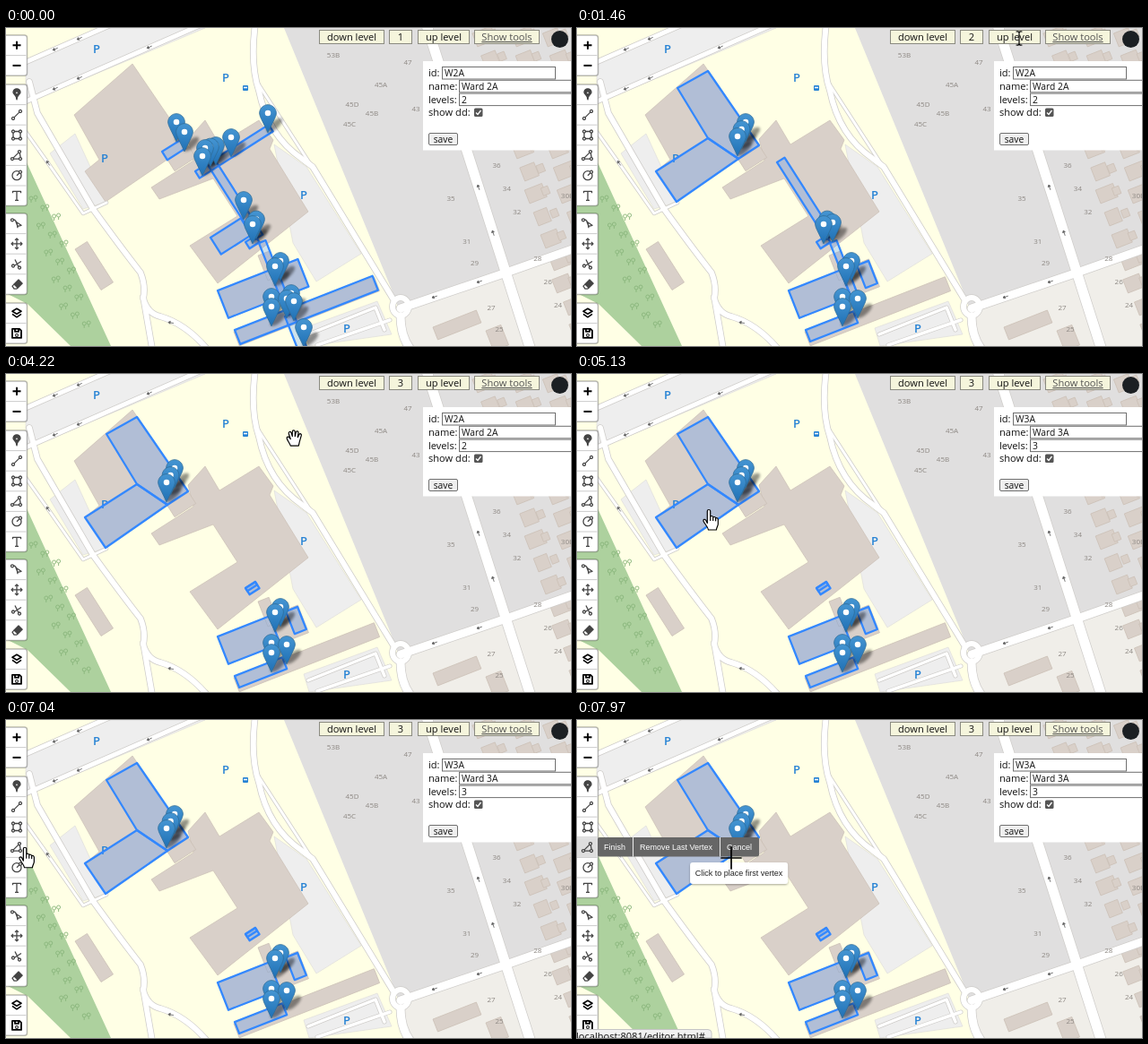
Recreate the animation shown at these times as an HTML page. Size 630 px wide and 355 px high, loop 8000 ms.

```html
<!DOCTYPE html>
<html lang="en">
<head>
<meta charset="utf-8">
<title>Floor plan editor</title>
<style>
html, body { margin: 0; width: 100%; height: 100%; overflow: hidden; }
svg { display: block; width: 100vw; height: 100vh; }
text { font-family: "Open Sans", "Noto Sans", sans-serif; white-space: pre; }
.small { font: 9px "Liberation Sans", Arial, sans-serif; }
.house { fill: #d9d0c9; stroke: #cabfb5; stroke-width: .7; }
.park { fill: #eeeeee; stroke: #dcdbd8; stroke-width: .6; }
.num { font-size: 8px; fill: #8c8782; text-anchor: middle; }
.letter { font-size: 13px; font-weight: 600; fill: #2682d4; text-anchor: middle; }
.ui { font-size: 11.1px; fill: #111; }
.value { font-size: 10.3px; fill: #111; }
.mid { text-anchor: middle; }
.box { fill: #f5f5dc; stroke: #8a8a80; }
.field { fill: #fff; stroke: #6f6f6f; }
.room { fill: #3388ff; fill-opacity: .24; stroke: #3388ff; stroke-width: 2.3; stroke-linejoin: round; }
.icon { fill: none; stroke: #444; stroke-width: 1.3; stroke-linejoin: round; }
</style>
</head>
<body>
<svg viewBox="0 0 630 355" preserveAspectRatio="none">
  <defs>
    <linearGradient id="blue" x2="0" y2="1"><stop stop-color="#4595d2"/><stop offset="1" stop-color="#1f70b5"/></linearGradient>
    <filter id="blur" x="-50%" y="-50%" width="200%" height="200%"><feGaussianBlur stdDeviation="1.8"/></filter>
    <filter id="soft" x="-10%" y="-30%" width="120%" height="170%"><feDropShadow dx="0" dy="1" stdDeviation="1.2" flood-opacity=".35"/></filter>
    <g id="pin">
      <path d="M12.5 .5C5.9 .5 .5 6.2 .5 12.4c0 2.8 1.6 6.3 2.7 8.7L12.5 40.5 21.8 21.1c1.1-2.4 2.7-5.9 2.7-8.7C24.5 6.2 19.1 .5 12.5 .5z" fill="url(#blue)" stroke="#2e6c97"/>
      <circle cx="12.5" cy="12.5" r="4.2" fill="#fff"/>
    </g>
    <ellipse id="shade" cx="22" cy="30" rx="14" ry="5.5" transform="rotate(-42 22 30)" opacity=".42" filter="url(#blur)"/>
    <g id="tree" fill="none" stroke="#8ab67c" stroke-width=".9"><circle r="2" cx="-2"/><circle r="2" cx="3" cy="-1"/><path d="M-2 2v3M3 1v3"/></g>
    <path id="arrow" d="M-3 0H3M-3 0l2-1.500v3z" fill="#666" stroke="#666" stroke-width=".8"/>
  </defs>
  <rect width="630" height="355" fill="#ffffe5"/>
  <g id="land"></g>
  <g id="roads" fill="none" stroke-linecap="round" stroke-linejoin="round"></g>
  <g id="labels"></g>
  <g id="rooms"></g>
  <g id="pins"></g>
  <g id="tip">
    <rect x="-54.5" width="109" height="24" rx="3" fill="#fff" filter="url(#soft)"/>
    <text class="small mid" y="14.5" fill="#222">Click to place first vertex</text>
  </g>
  <g id="bar"></g>
  <g id="menu" fill="#fff">
    <rect x="23" y="131" width="180" height="21.5" rx="2" fill="#666"/>
    <path d="M62.5 131v21.5M159.5 131v21.5" stroke="#eee"/>
    <text class="small" x="30" y="144.5">Finish</text><text class="small" x="70" y="144.5">Remove Last Vertex</text><text class="small" x="167" y="144.5">Cancel</text>
  </g>
  <g id="panel"></g>
  <g id="status">
    <path d="M0 345.5H146q4 0 4 4V355H0z" fill="#f1f1f1" stroke="#c4c4c4"/>
    <text class="ui" x="-1" y="357">localhost:8081/editor.html#</text>
  </g>
  <g id="cursor" fill="#fff" stroke="#000" stroke-width="1.2" stroke-linejoin="round" stroke-linecap="round">
    <path id="grab" d="M-4 8.500C-5 5-9 1-8-1c1-1.500 3 0 4 2L-6-5c-.5-2.500 2-3 2.800-1L-2-2V-7c0-2.300 2.800-2.300 3 0V-2L2-6.500c.6-2.200 3-1.500 2.700 .5L4-1 5.500-4c1-1.800 3-.8 2.500 1L6 4 5 8.500z"/>
    <path id="hand" d="M-1.700 15V1.500C-1.700-.5 1.700-.5 1.700 1.500V8c.4-1.500 3-1.300 3 .6 .6-1 2.800-.8 2.900 .9 .7-.8 2.700-.4 2.700 1.500V16c0 2-1.700 3.500-1.900 6.500H-.5C-1 19-5 15.500-6 12.700c-.6-2 1.500-2.500 2.500-1.200zM1.700 8v4M4.700 8.600v3.400M7.600 9.500v2.800"/>
    <path id="beam" d="M-3-7.500Q0-8 0-6 0-8 3-7.500M0-6.500V6.500M-3 7.500Q0 8 0 6 0 8 3 7.500" fill="none"/>
    <path id="cross" d="M-11 0H11M0-12V12" stroke-width="1.700"/>
  </g>
</svg>
<script>
const $ = id => document.getElementById(id);
const add = (id, html) => $(id).insertAdjacentHTML('beforeend', html);
const show = (id, on) => $(id).setAttribute('display', on ? 'inline' : 'none');
const place = (id, x, y) => $(id).setAttribute('transform', `translate(${x} ${y})`);
const poly = (cls, points) => `<polygon class="${cls}" points="${points}"/>`;
const text = (cls, x, y, s, id = '') => `<text class="${cls}" x="${x}" y="${y}" id="${id}">${s}</text>`;
const rect = (cls, x, y, w, h, more = '') => `<rect class="${cls}" x="${x}" y="${y}" width="${w}" height="${h}" ${more}/>`;
const use = (id, x, y, more = '') => `<use href="#${id}" transform="translate(${x} ${y}) ${more}"/>`;

// The site is built on two tilted grids; a slab is a rectangle turned about its corner.
const NORTH = -32.5, SOUTH = -21.4;
const slab = (cls, angle, x, y, w, h) => rect(cls, x, y, w, h, `transform="rotate(${angle} ${x} ${y})"`);
const avenue = y => 470 + y * .32;

let seed = 7;
const random = () => (seed = seed * 16807 % 2147483647) / 2147483647;

function drawLand() {
  add('land', '<path d="M310 0L430 292 440 320H630V0z" fill="#e0dfdf"/><path d="M440 314L630 250V355H450z" fill="#f0eee9"/>' +
    '<path d="M0 100L117 355H72L24 308 0 296z" fill="#add19e"/>');
  for (let i = 0; i < 15; i++) add('land', use('tree', 30 + i % 3 * 10 + i * 2.8, 190 + i * 10));
  ['22,38 110,0 222,0 22,84', '49,140 77,118 112,194 86,202', '299,130 335,155 396,252 346,283 320,240', '332,335 414,305 430,342 338,355']
    .forEach(p => add('land', poly('park', p)));
  add('land',
    poly('house', '76,97 141,40 203,131 111,194 88,160 104,147') +
    poly('house', '162,178 209,148 203,124 222,103 238,130 282,103 298,125 294,135 337,205 236,285 205,243 258,210 231,168 171,191') +
    slab('house', NORTH, 180, 147, 28, 15) + slab('house', NORTH, 77, 247, 16, 54) +
    slab('house', SOUTH, 236, 293, 96, 33) + slab('house', SOUTH, 281, 254, 13, 30) + slab('house', SOUTH, 254, 339, 168, 17) +
    slab('house', SOUTH, 476, 334, 52, 15) + slab('house', SOUTH, 535, 338, 18, 24));
  // houses follow the avenue in three rows
  for (let row = 0; row < 3; row++) for (let y = 6; y < 350; y += 25) {
    const x = avenue(y) + 48 + row * 38 + random() * 6;
    add('land', slab('house', SOUTH, x, y, 15 + random() * 8, 16) + slab('house', SOUTH, x + 18, y - 2, 8, 9));
  }
}

function drawRoads() {
  const roads = [
    ['M26 60L35 95 97 202Q128 245 150 273 156 288 153 302 158 319 172 322 200 330 224 358M153 300L163 358', 6],
    ['M20 113L47 151 86 207 112 195M281 62L338 150', 3],
    ['M278-5Q272 40 282 70 292 120 330 146L342 155 432 303', 6],
    [`M${avenue(-5)}-5L${avenue(360)} 360`, 11],
    ['M440 313L555 274 640 244M440 322Q440 345 452 360', 9],
    ['M337 342L412 312M347 354L428 326M412 312L422 337', 3.5],
    ['M431 311a9 10 0 1 0 18 0a9 10 0 0 0-18 0', 6]
  ];
  for (const y of [38, 82]) {
    roads.push([`M22 ${y}l210-92`, 5]);
    for (const x of [55, 82, 160]) add('labels', use('arrow', x, y - (x - 22) * .44, 'rotate(-24)'));
  }
  for (const edge of [1.5, 0]) for (const [d, w] of roads)
    add('roads', `<path d="${d}" stroke="${edge ? '#cfcdca' : '#fff'}" stroke-width="${w + edge}"/>`);
}

function drawLabels() {
  for (const y of [178, 229]) add('labels', use('arrow', avenue(y), y, 'rotate(71)'));
  for (const x of [478, 528]) add('labels', use('arrow', x, 313 - (x - 440) * .34, 'rotate(-19)'));
  add('labels', use('arrow', 47, 151, 'rotate(55)') + use('arrow', 184, 329, 'rotate(10)'));
  [[101, 28], [245, 60], [110, 150], [332, 191], [380, 340]].forEach(p => add('labels', text('letter', ...p, 'P')));
  add('labels', '<rect x="264" y="64" width="6" height="6" rx="1" fill="#2682d4"/><path d="M265 66.500h4" stroke="#fff" stroke-width="1.500"/>');
  // odd numbers west of the avenue, even ones east
  for (let n = 35; n >= 25; n -= 2) {
    const y = 193 + (35 - n) * 12 + (n < 28 ? 26 : 0);
    if (n !== 33) add('labels', text('num', 496 + (y - 193) * .37, y, n));
  }
  for (let n = 36; n >= 24; n -= 2) {
    const y = 156 + (36 - n) * 13;
    if (n !== 30) add('labels', text('num', 547 + (y - 156) * .44, y, n));
  }
  Object.entries({ '53B': [365, 33], '47': [448, 41], '45A': [418, 66], '45D': [386, 88], '45B': [408, 98], '45C': [383, 110], '43': [457, 93], '30B': [626, 190] })
    .forEach(([n, p]) => add('labels', text('num', ...p, n)));
}

const row = (n, x, y, dx = 0, dy = 0) => Array.from({ length: n }, (_, i) => [x + dx * i, y + dy * i]);

function drawLevels() {
  const north = (...a) => slab('room', NORTH, ...a), south = (...a) => slab('room', SOUTH, ...a);
  const wards = poly('room', '112,67 146,48 203,131 180,146 146,123') + poly('room', '88,160 146,123 180,146 111,194');
  const corridor = north(223, 150, 10, 102), stairs = north(267, 239, 13, 8.5);
  const block = south(236, 293, 62, 33) + south(312, 265, 14, 27) + south(255, 337, 57, 14);
  const entry = row(3, 179, 121, 4.5, -8), hall = row(2, 275, 219, 4, -5.5);
  const lower = [...row(2, 300, 266, 6, -6), ...row(2, 296, 311, 0, -11), [313, 302]];
  const levels = [
    [north(174, 138, 24, 11) + north(211, 160, 97, 9) + corridor + north(228, 234, 40, 22) + stairs + south(282, 240, 8, 70) +
      south(236, 293, 96, 33) + south(255, 337, 165, 17) + south(311, 322, 10, 42),
    [...row(2, 190, 105, 9, 11), ...row(2, 251, 122, 41, -27), ...row(3, 222, 134, 6, -1.5), [219, 143], [265, 192], ...hall, ...lower, ...row(2, 318, 296, 3, 9), [332, 334]]],
    [wards + corridor + stairs + south(282, 240, 8, 62) + block, [...entry, ...hall, [285, 217], ...lower]],
    [wards + stairs + north(267, 239, 13, 4) + block, [...entry, ...lower]]
  ];
  levels.forEach(([rooms, pins], i) => {
    pins.sort((a, b) => a[1] - b[1]);
    const all = id => pins.map(([x, y]) => use(id, x - 9.75, y - 9.75, 'scale(.78)')).join('');
    add('rooms', `<g id="rooms${i}">${rooms}</g>`);
    add('pins', `<g id="pins${i}">${all('shade')}${all('pin')}</g>`);
  });
}

function drawBar() {
  const dots = s => s.split(' ').map(p => p.split(',')).map(([x, y]) => `<circle cx="${x}" cy="${y}" r="1.500" fill="#fff"/>`).join('');
  const path = (d, more = '') => `<path d="${d}" ${more}/>`;
  const groups = [
    [8, [path('M-4.500 0H4.500M0-4.500V4.500', 'stroke="#000" stroke-width="2"'), path('M-4.500 0H4.500', 'stroke="#000" stroke-width="2"')]],
    [63, [
      path('M0 5.500C-1-1-4 0-4-2.500a4 4 0 0 1 8 0C4 0 1-1 0 5.500z', 'fill="#444"') + dots('0,-2'),
      path('M-4 4L4-4') + dots('-4,4 4,-4'),
      path('M-4-4H4V4H-4z') + dots('-4,-4 4,-4 -4,4 4,4'),
      path('M-5 4L3-4 4.500 4z') + dots('-5,4 3,-4 4,4'),
      '<circle r="5"/>' + path('M0 0L4-4') + dots('4,-4'),
      path('M-4.500-3V-5H4.500V-3M0-5V5M-2 5H2')]],
    [207, [
      path('M-5-4Q0-6 1 5M-1-2L5 2 1 3z') + dots('-5,-4'),
      path('M-6 0H6M0-6V6M-4-2L-6 0-4 2M4-2L6 0 4 2M-2-4L0-6 2-4M-2 4L0 6 2 4'),
      path('M-2-5L2 3M5-3L-3 2') + dots('3,4 -4,2'),
      path('M-5 2L2-5 6-1 0 5H-3z') + path('M-3 0L2-5 6-1 1 4z', 'fill="#444"')]],
    [307, [
      path('M-5-2L0-5 5-2 0 1zM-5 1L0 4.500 5 1', 'stroke="#000" stroke-width="1.600"'),
      path('M-5-5H3L5-3V5H-5zM-2-5V-2H2V-5', 'stroke="#000" stroke-width="1.800"') + dots('0,2')]]
  ];
  for (const [top, icons] of groups) {
    const h = 22.6;
    add('bar', rect('', -3, top, 26.5, h * icons.length, 'rx="3" fill="#fff" stroke="#000" stroke-opacity=".28" stroke-width="1.500"'));
    icons.forEach((icon, i) => {
      const y = top + h * i;
      if (i) add('bar', `<path d="M0 ${y}H22.500" stroke="#ccc"/>`);
      if (top === 63 && i === 3) add('bar', rect('', 0, y + .5, 22.5, h - 1, 'id="active" fill="#dedede"'));
      add('bar', `<g class="icon" transform="translate(12 ${y + h / 2})">${icon}</g>`);
    });
  }
}

function drawPanel() {
  const button = (x, w, s, id) => add('panel', rect('box', x + .5, 2.5, w, 15) + text('ui mid', x + w / 2 + .5, 14, s, id));
  button(349, 72, 'down level', 'down');
  button(427, 25, '1', 'level');
  button(459, 57, 'up level', 'up');
  button(522, 72, 'Show tools', 'tools');
  $('tools').style.cssText = 'fill:#555;text-decoration:underline';
  add('panel', '<circle cx="617.500" cy="12.500" r="9.500" fill="#1b1f23"/>' + rect('', 465, 37, 165, 99.5, 'fill="#fff"'));
  ['id:', 'name:', 'levels:', 'show dd:'].forEach((label, i) => {
    const y = 54 + i * 14.8, x = i ? 505 : 486;
    add('panel', text('ui', 471, y, label));
    if (i < 3) add('panel', rect('field', x + .5, y - 10.5, 126, 13.5) + text('value', x + 3, y, '', 'field' + i));
  });
  add('panel', rect('', 522, 89.5, 9.5, 9.5, 'rx="1.500" fill="#555"') + '<path d="M524 94.500l2 2 3.500-4.500" fill="none" stroke="#fff" stroke-width="1.300"/>' +
    rect('', 471.5, 117.5, 32, 13, 'rx="1.500" fill="#efefef" stroke="#6f6f6f"') + text('value mid', 487.5, 128, 'save'));
}

// Each move bends from a start past a control point to its end.
const easeOut = k => 1 - (1 - k) ** 1.4;
const easeIn = k => k ** 2.3;
const moves = [
  { t: [550, 1280], x: [427, 545, 493], y: [20, 8, 11.5], ease: easeOut },
  { t: [4090, 4880], x: [488, 58, 147], y: [14, 160, 151.5], ease: easeOut },
  { t: [6450, 7240], x: [147, 37, 12], y: [151.5, 148, 140], ease: easeOut },
  { t: [7430, 7970], x: [12, 92, 172], y: [140, 162, 154], ease: easeIn }
];
const bend = ([a, b, c], s) => a * (1 - s) ** 2 + 2 * b * s * (1 - s) + c * s * s;

function pointer(t) {
  const m = moves.filter(m => t >= m.t[0]).pop() || moves[0];
  const s = m.ease(Math.max(0, Math.min(1, (t - m.t[0]) / (m.t[1] - m.t[0]))));
  return [bend(m.x, s), bend(m.y, s)];
}

function shapeAt(x, y, drawing) {
  if (drawing) return x < 70 ? 'hand' : 'cross';
  if (y < 18 && x > 428) return 'beam';
  const inWard = x > 92 && x < 180 && y > 123;
  return x < 24 || inWard ? 'hand' : 'grab';
}

function render(t) {
  const level = (t >= 1460) + (t >= 2780);
  for (let i = 0; i < 3; i++) ['rooms', 'pins'].forEach(id => show(id + i, i === level));
  $('level').textContent = level + 1;
  const ward = t < 5130 ? 2 : 3;
  [`W${ward}A`, `Ward ${ward}A`, ward].forEach((s, i) => $('field' + i).textContent = s);

  const drawing = t >= 7370;
  ['menu', 'tip', 'status', 'active'].forEach(id => show(id, drawing));
  const [x, y] = pointer(t);
  place('cursor', x, y);
  if (t < 7430) place('tip', 315, 188);
  else place('tip', x * 1.05, 159);
  const visible = t >= 550 && (t < 3720 || t >= 4090);
  const shape = shapeAt(x, y, drawing);
  ['grab', 'hand', 'beam', 'cross'].forEach(id => show(id, visible && id === shape));
}

[drawLand, drawRoads, drawLabels, drawLevels, drawBar, drawPanel].forEach(draw => draw());
const start = performance.now();
function tick() {
  render((performance.now() - start) % 8000);
  requestAnimationFrame(tick);
}
tick();
</script>
</body>
</html>
```
